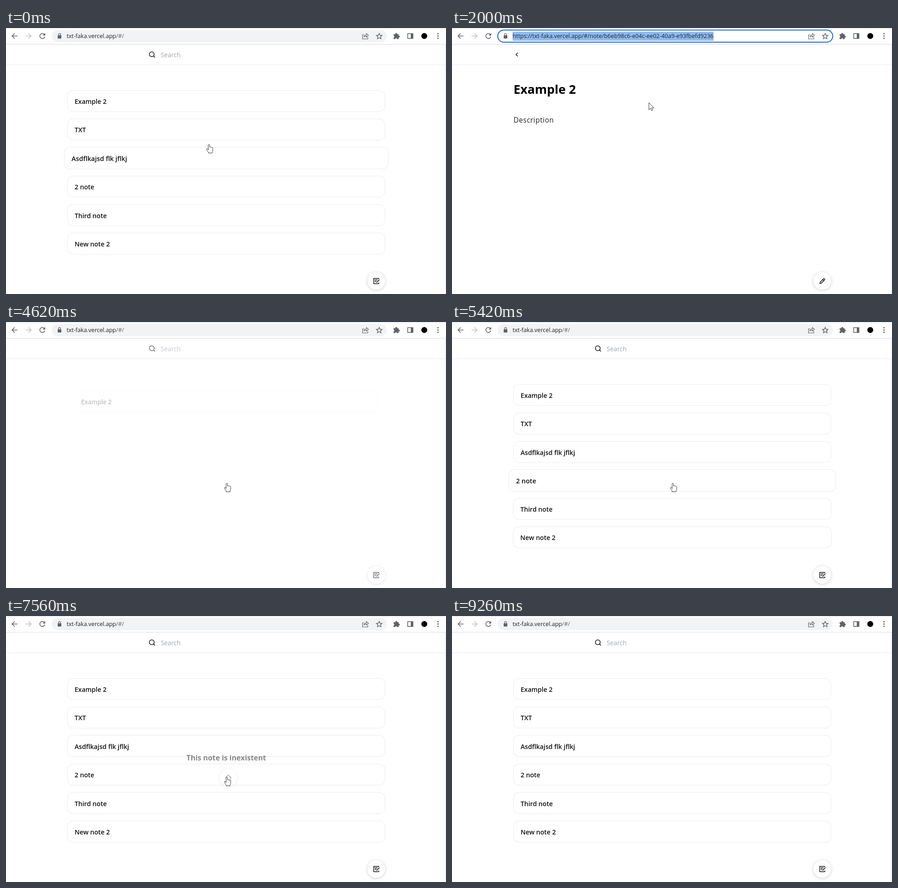
These frames come from a looping animation (962 px wide and 582 px high, 9390 ms). An HTML page:

```html
<!DOCTYPE html>
<html lang="en">
<head>
<meta charset="utf-8">
<title>Notes</title>
<style>
  html, body { margin: 0; width: 100%; height: 100%; overflow: hidden; background: #fff; }
  svg { display: block; width: 962px; height: 582px; font: 12.6px "Open Sans", "Noto Sans", sans-serif; }
  text { white-space: pre; }
  .line { fill: none; stroke: #5f6368; stroke-width: 1.6; }
  .ink { fill: none; stroke: #111; stroke-width: 1.5; stroke-linecap: round; stroke-linejoin: round; }
  .solid { fill: #5f6368; }
  .dark { fill: #202124; }
  .soft { fill: #5f6368; }
  .round { fill: #fff; filter: drop-shadow(0 1px 3px rgba(0,0,0,.2)); }
  .card rect { fill: #fff; stroke: #e9ebee; }
  .card text { font-size: 14.1px; font-weight: 600; fill: #111; }
  .pop { fill: #fff; filter: drop-shadow(0 4px 6px rgba(0,0,0,.32)); }
  .pointer { fill: #fff; stroke: #333; stroke-width: 1; stroke-linejoin: round; }
</style>
</head>
<body>
<svg viewBox="0 0 962 582">
  <defs>
    <g id="globe">
      <circle r="6.3" class="solid"/>
      <path d="M-4.8-1.5L-1 2V5Q-5 3.5-4.8-1.5M0-5Q5-4 5 1L2 3 1 0-2-1Z" fill="#fff"/>
    </g>
    <g id="lens" class="line"><circle cx="-1.2" cy="-1.2" r="3.7"/><path d="M1.5 1.5L5.5 5.5"/></g>
  </defs>

  <path d="M0 80.5H962" stroke="#e8eaed"/>

  <g id="list">
    <g id="tools">
      <g class="ink"><circle cx="318.7" cy="57.5" r="5.3"/><path d="M322.6 61.4L325.3 64"/></g>
      <text x="338" y="64" font-size="13.9" fill="#a1a5ad">Search</text>
      <circle class="round" cx="809.5" cy="553.5" r="19.3"/>
      <path class="ink" d="M815 549V547.7H804V559.5H815V557.5M806.7 551H812M806.7 554H809.5M810.5 556.6L816 551"/>
    </g>
    <g id="cards"></g>
  </g>

  <g id="note">
    <path class="ink" d="M143.3 54.5L139.8 58L143.3 61.5"/>
    <text x="134.5" y="143.5" font-size="26.8" font-weight="700">Example 2</text>
    <text x="134.5" y="206.5" font-size="15.5" letter-spacing=".5" fill="#222">Description</text>
    <circle class="round" cx="809.5" cy="553.5" r="19.3"/>
    <path class="ink" d="M804.3 559L805 556L812.2 548.7Q813.5 547.8 814.6 549Q815.6 550.1 814.6 551.2L807.3 558.4ZM810.7 550.3L813 552.6"/>
  </g>

  <g id="lost">
    <text x="481.5" y="316" font-size="15.9" font-weight="700" text-anchor="middle">This note is inexistent</text>
    <circle class="round" cx="486" cy="354" r="19"/>
    <path class="ink" style="stroke:#444" d="M480 353.7L486 348L492 353.7M481.8 352.5V359.3H490.2V352.5"/>
  </g>

  <g id="bar">
    <path d="M0 0H962V35H0Z" fill="#fff"/>
    <path d="M0 .5H962M0 35.5H962" stroke="#d8dadd"/>
    <path d="M961.5 36V582" stroke="#dedfe1"/>
    <path class="line" d="M25 17.5H13.5M19 11.7L13.2 17.5L19 23.3"/>
    <path class="line" style="stroke:#bdc1c6" d="M43 17.5H54.5M49 11.7L54.8 17.5L49 23.3"/>
    <path class="line" d="M83.8 14A5.5 5.5 0 1 0 84.8 19"/>
    <path class="solid" d="M85.7 11V16.5H80.2Z"/>
    <rect id="pill" x="100" y="4.5" width="732.5" height="26.5" rx="13.2"/>
    <g id="lock">
      <rect class="solid" x="113" y="16" width="8" height="7" rx="1"/>
      <path class="line" style="stroke-width:1.3" d="M114.7 16V14.5A2.3 2.3 0 0 1 119.3 14.5V16"/>
    </g>
    <g class="line" style="stroke-width:1.2">
      <path d="M783 15H779.5V24H791V20M782.5 20Q783 15 788 15V12L792.5 16L788 20V17.3Q784.5 17.3 782.5 20"/>
      <path style="stroke-width:1.4" d="M816 11.7L817.8 15.8L822.2 16.2L818.9 19.1L819.9 23.5L816 21.2L812.1 23.5L813.1 19.1L809.8 16.2L814.2 15.8Z"/>
    </g>
    <path class="solid" d="M847.5 13.5H851.3A2 2 0 1 1 855.2 13.5H858.5V16.8A2 2 0 1 1 858.5 20.7V24.3H855A2 2 0 0 0 851 24.3H847.5V20.7A2 2 0 0 0 847.5 16.8Z"/>
    <rect class="line" x="878.3" y="12.3" width="11.4" height="10.6"/>
    <path class="solid" d="M885 12H890V23H885Z"/>
    <circle cx="914.5" cy="17.5" r="6.5" fill="#000"/>
    <g class="solid"><circle cx="944.5" cy="12.5" r="1.6"/><circle cx="944.5" cy="17.5" r="1.6"/><circle cx="944.5" cy="22.5" r="1.6"/></g>
  </g>

  <g id="drop">
    <path id="sheet" class="pop"/>
    <path d="M94.5 35H838.5V70.5H94.5Z" fill="#e8e8e8"/>
    <path d="M94.5 35H97.5V70.5H94.5Z" fill="#1a73e8"/>
    <use href="#globe" x="117" y="17.5"/>
    <use href="#globe" x="117" y="53"/>
    <use href="#lens" x="117" y="89"/>
    <text id="best" x="142.5" y="57" font-weight="700" fill="#2262c6"></text>
    <text x="142.5" y="93" class="dark"><tspan id="query"></tspan><tspan class="soft"> - Velnor Search</tspan></text>
    <g id="past">
      <use href="#globe" x="117" y="125"/>
      <text id="visited" x="142.5" y="129" fill="#2262c6"></text>
    </g>
  </g>

  <rect id="mark" x="132.5" y="8" height="20" fill="#8fbcf0"/>
  <text id="url" y="22.3"><tspan id="scheme" class="soft"></tspan><tspan class="dark">txt-faka.vercel.app</tspan><tspan id="path"></tspan></text>
  <path id="caret" d="M0 10V26" stroke="#111"/>

  <g id="cursor" class="pointer">
    <path id="arrow" d="M0 0V15.5L3.6 12.2L5.9 17.4L8.2 16.4L6 11.3H11Z"/>
    <path id="hand" d="M-1.7 12V1.2Q0-.8 1.5 1.2V6.2Q3 5 4.3 6.6Q5.8 5.8 6.6 7.3Q8.3 6.9 8.3 9V13Q8 15 7 16.5V19H-1.5V17.5Q-4 14-5.6 11.2Q-5.4 8.8-3.4 9.6Z"/>
  </g>
</svg>
<script>
const LOOP = 9390;
const $ = id => document.getElementById(id);
const clamp = v => Math.min(1, Math.max(0, v));
const ramp = (t, from, to) => clamp((t - from) / (to - from));
const ease = p => p * p * (3 - 2 * p);
const latest = (rows, t) => rows.filter(row => row[0] <= t).pop();
const show = (id, on) => { $(id).style.display = on ? '' : 'none'; };
const fade = (id, value) => { $(id).style.opacity = value; show(id, value > 0); };

const HOST = 'https://txt-faka.vercel.app';
const HOME = '/#/';
const CUT = '/#/note/b6eb98c6-e04c-ee02-40a9-';
const NOTE = CUT + 'e93fbefd9236';
const TYPED = 'lskdfjlkf';

// start, path, mode, suggestion rows
const address = [
  [0, HOME, 'plain'], [610, NOTE, 'plain'], [2000, NOTE, 'selected'], [2460, NOTE, 'caret'],
  [2870, CUT, 'drop', 2], [2940, CUT, 'drop', 3], [3410, CUT, 'plain'],
  [4350, HOME, 'plain'], [5630, HOME, 'selected'], [5830, HOME, 'caret'],
  ...[6170, 6230, 6300, 6370, 6430].map((at, i) => [at, HOME + TYPED.slice(0, 2 * i + 2), 'drop', 2]),
  [6630, HOME + TYPED, 'plain'], [7500, HOME, 'plain']
];

const moves = [
  [0, 444, 254.5], [470, 430.5, 163.5], [3680, 430.5, 163.5],
  [4150, 483, 352.5], [8500, 483, 352.5], [9200, 890, 592]
];
const handTimes = [[0, 800], [4080, 8620], [8660, 8770], [8800, 8895]];

// card, pointer enters, pointer leaves
const hovers = [
  [2, -900, -55], [1, 93, 273], [0, 324, 1000],
  [3, 4940, 6800], [3, 8090, 8620], [4, 8660, 8770], [5, 8800, 8895]
];
const entries = [[-3000], [4570], [7720]];
const STAGGER = 100;

const cards = ['Example 2', 'TXT', 'Asdflkajsd flk jflkj', '2 note', 'Third note', 'New note 2'].map(title => {
  const card = document.createElementNS('http://www.w3.org/2000/svg', 'g');
  card.setAttribute('class', 'card');
  card.innerHTML = `<rect x="-347" y="-23.2" width="694" height="46.4" rx="12"/><text x="-331.5" y="6.3">${title}</text>`;
  $('cards').append(card);
  return card;
});

// Distance still to travel, from 1 to 0 with a slight overshoot
function spring(ms) {
  if (ms <= 0) return 1;
  const s = ms / 1000;
  return Math.exp(-8.4 * s) * (Math.cos(8.57 * s) + .98 * Math.sin(8.57 * s));
}

function drawPages(t) {
  const entry = latest(entries, t)[0];
  const leave = t < 4350 ? 1 - ramp(t, 610, 800) : t < 7500 ? 1 - ramp(t, 6600, 6700) : 1;
  fade('list', leave);
  fade('tools', ramp(t, entry - 70, entry + 130));
  fade('note', ease(ramp(t, 850, 1200)) * (1 - ramp(t, 3380, 3480)));
  fade('lost', t < 5000
    ? ramp(t, 3400, 3540) * (1 - ramp(t, 4320, 4490))
    : ramp(t, 6600, 6760) * (1 - ramp(t, 7470, 7640)));

  cards.forEach((card, i) => {
    const age = t - entry - i * STAGGER;
    const rest = spring(age);
    const hover = Math.max(...hovers.filter(h => h[0] === i)
      .map(([, on, off]) => ease(ramp(t, on, on + 150)) * (1 - ease(ramp(t, off, off + 150)))));
    const scale = (1 - .05 * rest) * (1 + .03 * hover);
    card.setAttribute('transform', `translate(481.5 ${159.7 + 62.4 * i + 17 * rest}) scale(${scale})`);
    card.style.opacity = clamp(age / 210);
  });
}

function drawAddress(t) {
  const [, path, mode, rows] = latest(address, t);
  const plain = mode === 'plain', selected = mode === 'selected', open = mode === 'drop';
  const x = open ? 142.5 : 132.5;
  $('scheme').textContent = plain ? '' : 'https://';
  $('path').textContent = path;
  $('scheme').setAttribute('class', selected ? 'dark' : 'soft');
  $('path').setAttribute('class', selected ? 'dark' : 'soft');
  $('url').setAttribute('x', x);
  const width = $('url').getComputedTextLength();

  $('pill').setAttribute('fill', plain ? '#f1f3f4' : '#fff');
  $('pill').setAttribute('stroke', plain ? 'none' : '#1a68d8');
  $('pill').setAttribute('stroke-width', 2);
  $('mark').setAttribute('width', width);
  $('caret').setAttribute('transform', `translate(${x + width + .5} 0)`);
  show('mark', selected);
  show('caret', open || mode === 'caret');
  show('lock', !open);
  show('drop', open);
  if (!open) return;
  const bottom = 42 + 36 * rows;
  $('sheet').setAttribute('d', `M94.5 8Q94.5 1 101 1H832Q838.5 1 838.5 8V${bottom - 7}q0 7-7 7H101.5q-7 0-7-7Z`);
  $('best').textContent = $('query').textContent = HOST + path;
  $('visited').textContent = (HOST + NOTE).slice(8);
  show('past', rows === 3);
}

function drawCursor(t) {
  const next = moves.findIndex(m => m[0] > t);
  const b = moves[next < 0 ? moves.length - 1 : next];
  const a = moves[next < 0 ? moves.length - 1 : next - 1];
  const p = a === b ? 1 : ease(ramp(t, a[0], b[0]));
  $('cursor').setAttribute('transform', `translate(${a[1] + (b[1] - a[1]) * p} ${a[2] + (b[2] - a[2]) * p})`);
  const hand = handTimes.some(([from, to]) => t >= from && t < to);
  show('hand', hand);
  show('arrow', !hand);
}

function render(t) {
  drawPages(t);
  drawAddress(t);
  drawCursor(t);
}

const start = performance.now();
function tick(now) {
  render(Math.max(0, now - start) % LOOP);
  requestAnimationFrame(tick);
}
render(0);
requestAnimationFrame(tick);
</script>
</body>
</html>
```
